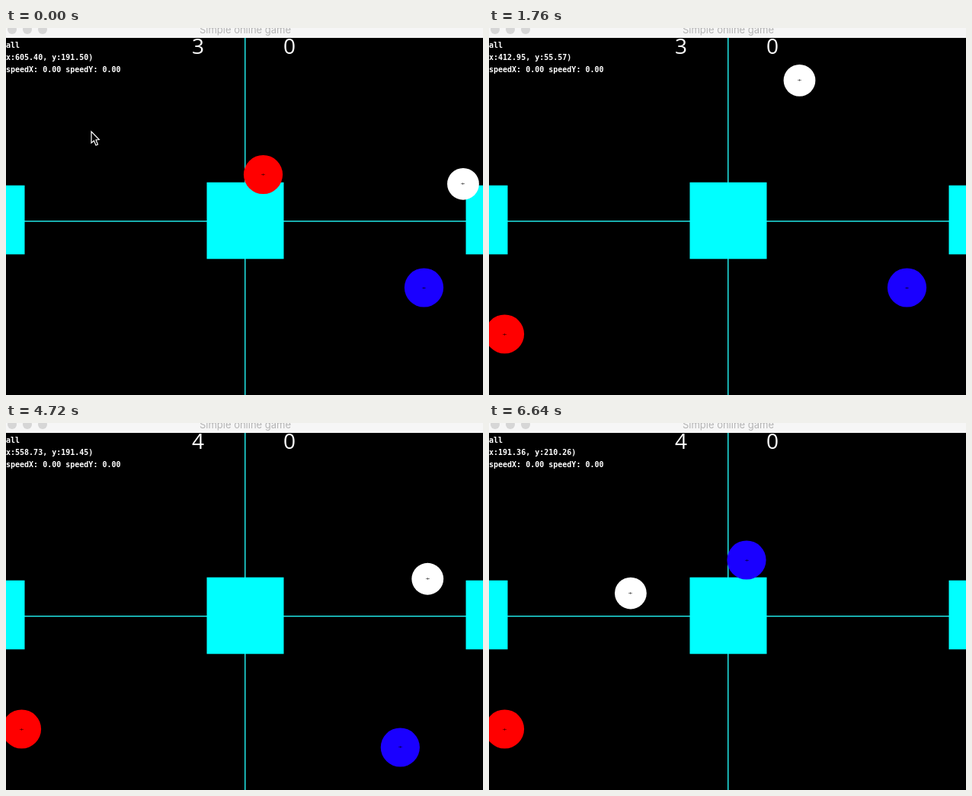
An HTML page with a canvas for the animation above (6.72 s loop, 626 by 482 pixels).

```html
<!DOCTYPE html>
<html lang="en">
<head>
<meta charset="utf-8">
<title>Simple online game</title>
<style>
  html, body { margin: 0; width: 100%; height: 100%; overflow: hidden; background: #000; }
  canvas { display: block; }
</style>
</head>
<body>
<canvas id="stage" width="626" height="482"></canvas>
<script>
const W = 626, H = 482, LOOP = 6720, STEP = 80;
const HIT = 560, CURSOR_GONE = 1120, GOAL = 4240;
const CEILING = 21, PLAYER_R = 25.6, BALL_R = 20.9;
const CYAN = '#00ffff', LINE = '#20e4e4';
const ctx = document.getElementById('stage').getContext('2d');

// Ways to travel one leg; k runs from 0 to 1
const mix = (a, b, k) => a + (b - a) * k;
const line = (a, b, k) => ({ x: mix(a.x, b.x, k), y: mix(a.y, b.y, k) });
const brake = (a, b, k) => line(a, b, 1 - (1 - k) ** 2);
const bounce = (a, b, k) => ({
  x: mix(a.x, b.x, k),
  y: CEILING + Math.abs(mix(a.y, 2 * CEILING - b.y, k) - CEILING)
});
const dip = depth => (a, b, k) => {
  const p = line(a, b, k);
  return { x: p.x, y: p.y + depth * Math.sin(Math.PI * k) };
};

class Mover {
  constructor(x, y) {
    this.time = 0;
    this.end = { x, y };
    this.legs = [];
  }
  to(time, x, y, way = line) {
    const a = this.end, b = { x, y };
    this.legs.push({ from: this.time, until: time, a, b, way });
    this.time = time;
    this.end = b;
    return this;
  }
  rest(time) {
    return this.to(time, this.end.x, this.end.y);
  }
  at(t) {
    const leg = this.legs.find(l => t < l.until);
    return leg ? leg.way(leg.a, leg.b, (t - leg.from) / (leg.until - leg.from)) : this.end;
  }
}

const red = new Mover(337.5, 192.5)
  .to(HIT, 512.5, 192.5)
  .to(720, 540, 300)
  .to(1440, 20.5, 402);

const blue = new Mover(548.5, 341).rest(1760)
  .to(2160, 548.5, 297, dip(80))
  .to(2640, 548.5, 161).rest(2720)
  .to(3200, 601, 101).rest(3360)
  .to(4000, 268.5, 299.5)
  .to(4800, 545, 404, dip(105))
  .to(5200, 601, 45)
  .to(5440, 556, 234.5)
  .to(6640, 338, 180);

// The ball moves in game coordinates, which the readout shows
const ball = new Mover(605.4, 191.5)
  .to(HIT, 558.36, 191.49)
  .to(1320, 21.58, 55.63, bounce)
  .to(2216, 549.75, 55.55, brake).rest(3440)
  .to(4000, 123.41, 216.13, bounce)
  .to(GOAL, 10, 262)
  .to(GOAL, 618, 191.5)
  .to(5440, 469.82, 191.38)
  .to(5760, 450, 191.3)
  .to(6640, 191.36, 210.26);

function rect(x, y, w, h, color) {
  ctx.fillStyle = color;
  ctx.fillRect(x, y, w, h);
}

function disc(x, y, r, color) {
  ctx.fillStyle = color;
  ctx.beginPath();
  ctx.arc(x, y, r, 0, Math.PI * 2);
  ctx.fill();
}

function piece({ x, y }, r, color) {
  disc(x, y, r, color);
  const cx = Math.floor(x), cy = Math.floor(y), shade = 'rgba(0,0,0,.45)';
  rect(cx - 2, cy, 5, 1, shade);
  rect(cx, cy - 1, 1, 3, shade);
}

function label(text, x, y, font, color = '#fff', align = 'left') {
  ctx.font = font;
  ctx.fillStyle = color;
  ctx.textAlign = align;
  ctx.fillText(text, x, y);
}

function court() {
  rect(0, 0, W, H, '#000');
  rect(313, 13, 1.5, H, LINE);
  rect(0, 253, W, 1.5, LINE);
  rect(263.5, 202.7, 101, 100.6, CYAN);
  rect(0, 206.7, 24.5, 90.6, CYAN);
  rect(603.5, 206.7, 23, 90.6, CYAN);
}

function titleBar() {
  rect(0, 0, W, 13, '#f6f6f6');
  for (let i = 0; i < 3; i++) disc(8 + 20 * i, 2, 6, '#d6d6d6');
  label('Simple online game', 314, 7, '13px Inter, sans-serif', '#b4b4b4', 'center');
}

function hud({ x, y }, t) {
  const speed = t === HIT ? 1.2 : 0;
  const rows = [
    'all',
    `x:${x.toFixed(2)}, y:${y.toFixed(2)})`,
    `speedX: ${speed.toFixed(2)} speedY: 0.00`
  ];
  rows.forEach((row, i) => label(row, 0, 26 + 16 * i, 'bold 10px "DejaVu Sans Mono", monospace'));
  const big = '28px "Open Sans", sans-serif';
  label(t < GOAL ? '3' : '4', 252, 34, big, '#fff', 'center');
  label('0', 372, 34, big, '#fff', 'center');
}

function cursor() {
  const arrow = new Path2D('M112 136v15l3.4-3 2.6 6 2.5-1-2.5-6 4.3-.4z');
  ctx.fillStyle = '#000';
  ctx.fill(arrow);
  ctx.strokeStyle = '#fff';
  ctx.lineWidth = 1.2;
  ctx.stroke(arrow);
}

function draw(t) {
  const pos = ball.at(t);
  court();
  piece(red.at(t), PLAYER_R, '#ff0000');
  piece(blue.at(t), PLAYER_R, '#1a00ff');
  piece({ x: pos.x - 5.45, y: pos.y + 13.3 }, BALL_R, '#fff');
  hud(pos, t);
  titleBar();
  if (t < CURSOR_GONE) cursor();
}

const start = performance.now();
function tick() {
  const t = (performance.now() - start) % LOOP;
  draw(Math.floor(t / STEP) * STEP);
  requestAnimationFrame(tick);
}
tick();
</script>
</body>
</html>
```
